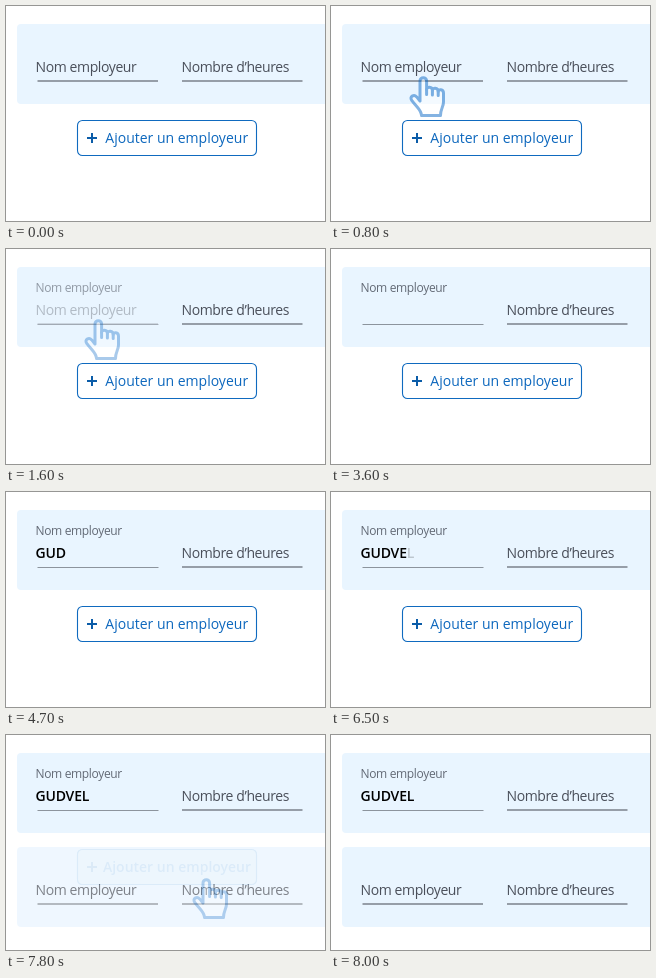
These frames come from a looping animation (319x215 px, 9500 ms). An HTML page:

```html
<!DOCTYPE html>
<html lang="fr">
<head>
<meta charset="utf-8">
<title>Ajouter un employeur</title>
<style>
  html, body { margin: 0; width: 100%; height: 100%; overflow: hidden; background: #fff; }
  svg { display: block; width: 319px; height: 215px; }
  text { font: 14px "Open Sans", "Noto Sans", sans-serif; fill: #4a4f5a; }
  .panel { fill: #e9f5ff; }
  .label { letter-spacing: -.4px; }
  .small { font-size: 12px; letter-spacing: -.35px; fill: #626975; }
  .line { stroke: #7b828b; stroke-width: 1.6; }
  .thin { stroke: #8c949d; stroke-width: 1; }
  .name { font-weight: 600; letter-spacing: -.2px; fill: #000; }
  .box { fill: #fff; stroke: #0f6abf; stroke-width: 1.1; }
  .hover .box { fill: #f1f1f1; }
  .action { fill: #0c67bd; text-anchor: middle; }
  .hover .action { font-weight: 600; }
  .plus { stroke: #0b5ca8; stroke-width: 2; }
  .hand { fill: #fff; stroke: #0b69c7; stroke-width: 3; stroke-linejoin: round; stroke-linecap: round; }
</style>
</head>
<body>
<svg viewBox="0 0 319 215">
  <defs>
    <g id="hours">
      <text class="label" x="175.5" y="66">Nombre d’heures</text>
      <path class="line" d="M176 75H296.5"/>
    </g>
    <g id="employer">
      <text class="label" x="29.5" y="66">Nom employeur</text>
      <path class="line" d="M31.5 75H152"/>
    </g>
    <rect id="panel" class="panel" x="11" y="18" width="320" height="80" rx="4"/>
    <g id="pointer" class="hand">
      <path d="M11 25V5a3.3 3.3 0 0 1 6.6 0V13.5c0-3 5.8-3 5.8 .8 0-2.8 5.8-2.8 5.8 1.2 0-2.6 5.3-2.4 5.3 1.6V26c0 5-3 7-3 13.5H12.5c0-5.5-4-7.5-9.8-15.2-2.6-3.6 2.2-6.4 5-3.4z"/>
      <path d="M17.6 13.5v5M23.4 14.3v4.7M29.2 15.5v4"/>
    </g>
    <g id="button">
      <rect class="box" x="71.5" y="114.5" width="179" height="35" rx="5"/>
      <path class="plus" d="M81 132h10M86 127v10"/>
    </g>
  </defs>

  <use href="#panel"/>
  <use href="#hours"/>
  <use id="empty" href="#employer"/>
  <g id="filled">
    <text class="small" x="29.5" y="43">Nom employeur</text>
    <path class="thin" d="M31.5 75.5H152.5"/>
  </g>
  <text id="name" class="name" x="29.5" y="66"></text>

  <g id="adder">
    <use href="#button"/>
    <text class="action" x="170.7" y="137">Ajouter un employeur</text>
    <g id="hover" class="hover">
      <rect class="box" x="71.5" y="114.5" width="179" height="35" rx="5"/>
      <path class="plus" d="M81 132h10M86 127v10"/>
      <text class="action" x="171" y="137">Ajouter un employeur</text>
    </g>
  </g>
  <g id="added" transform="translate(0 94)">
    <use href="#panel"/>
    <use href="#employer"/>
    <use href="#hours"/>
  </g>

  <use id="hand1" href="#pointer" x="78" y="70"/>
  <use id="hand2" href="#pointer" x="186" y="143"/>
</svg>
<script>
  const LOOP = 9500, STEP = 100;
  const $ = id => document.getElementById(id);
  const fade = (id, value) => { $(id).style.opacity = value; };

  // Start time and step count for each typed letter
  const typing = [[3700, 2], [3800, 3], [4500, 3], [5200, 3], [5900, 2], [6500, 3]];
  const letters = [..."GUDVEL"].map(char => {
    const span = document.createElementNS("http://www.w3.org/2000/svg", "tspan");
    span.textContent = char;
    $("name").append(span);
    return span;
  });

  // Progress 0..1 in whole steps; the first step lands on start
  const ramp = (t, start, steps) =>
    Math.min(1, Math.max(0, (Math.floor(t / STEP) - start / STEP + 1) / steps));
  const ease = p => p ** 1.5;

  function draw(t) {
    const focus = ease(ramp(t, 1400, 4));
    const press = ramp(t, 7100, 3);
    const add = ramp(t, 7400, 7);

    fade("hand1", ramp(t, 400, 10) * (1 - focus));
    fade("empty", 1 - focus);
    fade("filled", focus);
    letters.forEach((span, i) => {
      span.style.fillOpacity = ease(ramp(t, ...typing[i]));
    });
    fade("hover", press);
    fade("hand2", press * (1 - add));
    fade("adder", 1 - add);
    fade("added", add);
  }

  let origin;
  function tick(now) {
    origin ??= now;
    draw((now - origin) % LOOP);
    requestAnimationFrame(tick);
  }
  draw(0);
  requestAnimationFrame(tick);
</script>
</body>
</html>
```
